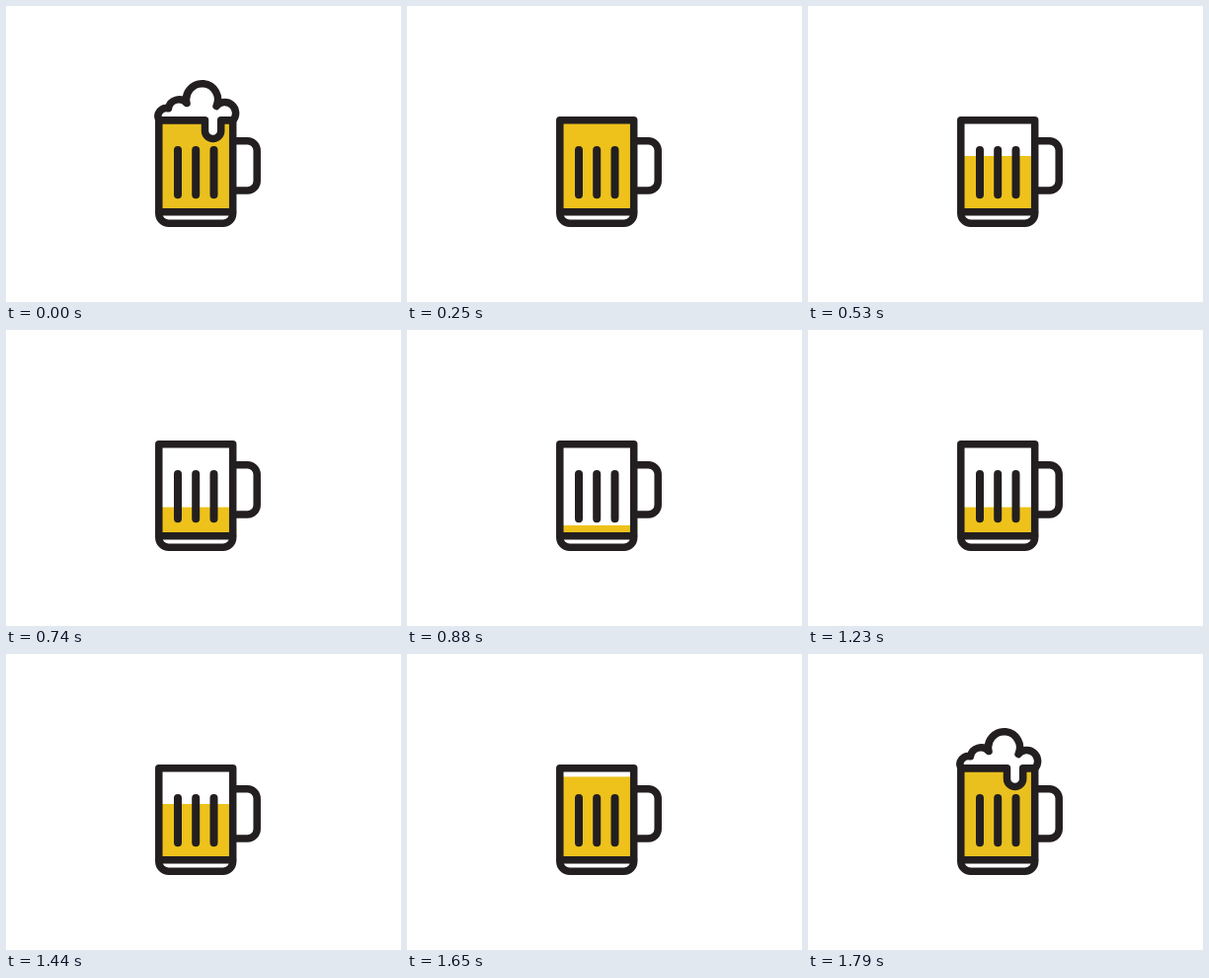
An HTML page that plays this animation: 400 by 300 pixels, repeating every 1860 ms.

```html
<!DOCTYPE html>
<html lang="en">
<head>
<meta charset="utf-8">
<title>Beer mug</title>
<style>
  html, body { margin: 0; width: 100%; height: 100%; overflow: hidden; background: #fff; }
  svg { display: block; width: 100%; height: 100%; }
  .line { fill: none; stroke: #231f20; stroke-width: 7.5; stroke-linecap: round; stroke-linejoin: round; }
  #foam { fill: #fff; }
</style>
</head>
<body>
<svg viewBox="0 0 400 300">
  <clipPath id="glass"><rect x="155" y="116" width="75" height="93"/></clipPath>
  <g clip-path="url(#glass)">
    <rect id="beer" x="155" y="0" width="75" height="220" fill="#eec21b"/>
  </g>
  <g class="line">
    <path d="M230 136.7H244.5a9.7 9.7 0 0 1 9.7 9.7V177.3a9.7 9.7 0 0 1 -9.7 9.7H230"/>
    <path d="M154.8 115.8H229.7V210.3a10 10 0 0 1 -10 10H164.8a10 10 0 0 1 -10 -10Z"/>
    <path d="M155 208.7H229.5"/>
    <path d="M174 146V191.3M192.2 146V191.3M210.5 146V191.3" stroke-width="8"/>
  </g>
  <path id="foam" class="line" d="M155 115.8H201.5V126.4a8.1 8.1 0 0 0 16.2 0V115.8H230
    A10.8 10.8 0 1 0 213 101.5A16 16 0 1 0 183 98.5
    A10.6 10.6 0 0 0 164.5 103.8A8.3 8.3 0 0 0 155 115.8Z"/>
</svg>
<script>
  const LOOP = 1860, STEP = 70, DRAIN = 250, FILL = 1090, FOAM = 1790;
  const TOP = 115.2, DROP = 9.2, LEVELS = 10;

  // Each row [ms, style] holds until the next row.
  function hold(id, rows) {
    const keys = rows.map(([ms, style]) => ({ offset: ms / LOOP, easing: "steps(1, end)", ...style }));
    keys.push({ ...keys[keys.length - 1], offset: 1 });
    document.getElementById(id).animate(keys, { duration: LOOP, iterations: Infinity }).startTime = 0;
  }

  const level = n => ({ transform: `translateY(${TOP + DROP * n}px)`, fill: "#eec21b" });
  const full = { ...level(0), fill: "#e9c01e" };
  const beer = [[0, full]];
  for (let n = 0; n <= LEVELS; n++) beer.push([DRAIN + n * STEP, level(n)]);
  for (let n = LEVELS - 1; n >= 0; n--) beer.push([FILL + (LEVELS - 1 - n) * STEP, level(n)]);
  beer.push([FOAM, full]);

  hold("beer", beer);
  hold("foam", [[0, { opacity: 1 }], [DRAIN, { opacity: 0 }], [FOAM, { opacity: 1 }]]);
</script>
</body>
</html>
```
